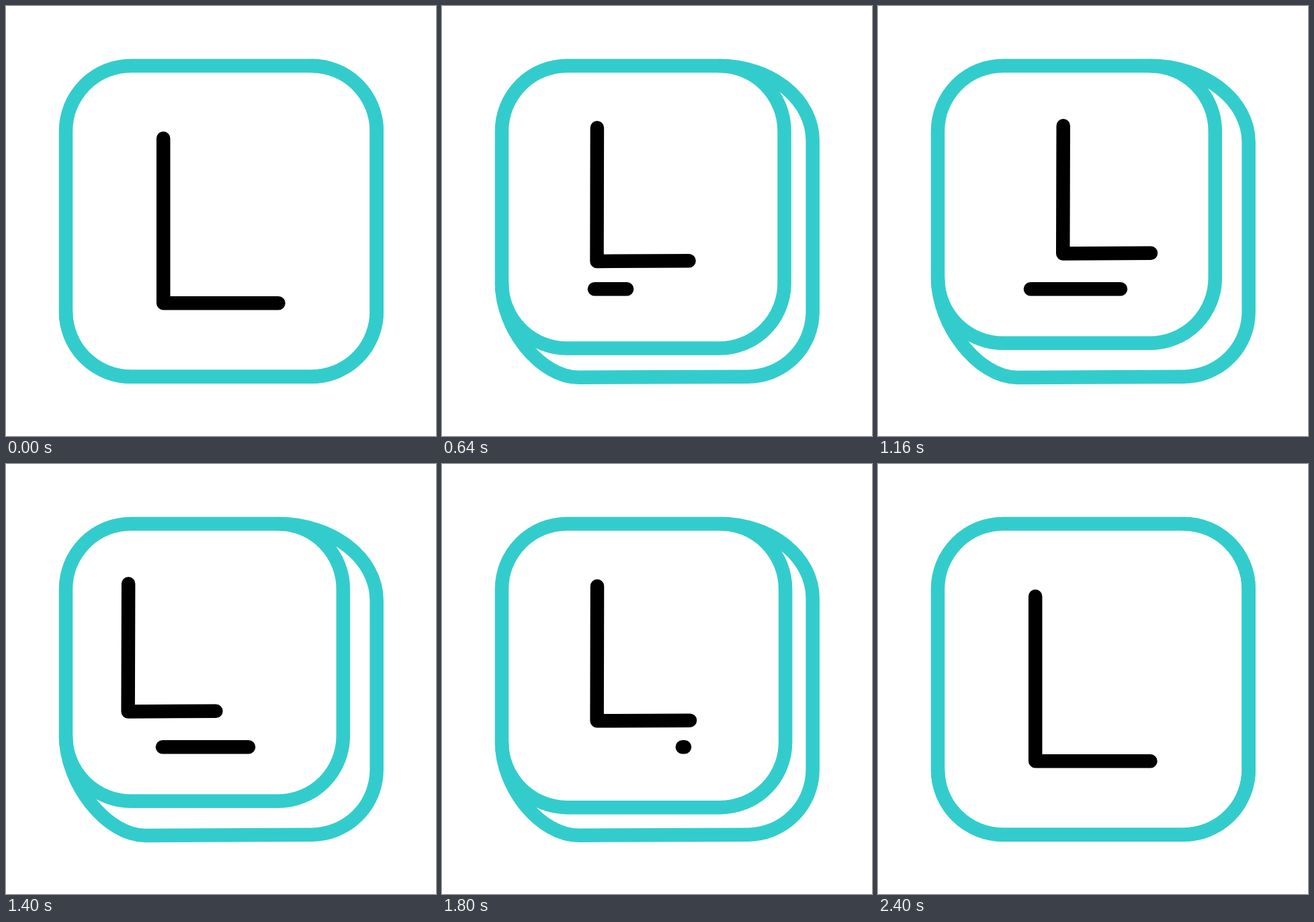
Animation, 640 px wide and 640 px high, one loop 2480 ms. Source, as an HTML page:

```html
<!DOCTYPE html>
<html lang="en">
<head>
<meta charset="utf-8">
<title>Key press</title>
<style>
  html, body { margin: 0; height: 100%; overflow: hidden; background: #fff; }
  svg { display: block; width: 100%; height: 100%; }
  path { fill: none; stroke-width: 20.5; stroke-linecap: round; stroke-linejoin: round; }
  .key { stroke: #3cc; }
  .ink { stroke: #000; }
</style>
</head>
<body>
<svg viewBox="0 0 640 640">
  <path id="side" class="key"/>
  <path id="face" class="key"/>
  <path id="letter" class="ink"/>
  <path id="line" class="ink"/>
</svg>
<script>
const LOOP = 2480, STEP = 40;
const LOW = 89, HIGH = 551.7, R = 97;

const $ = id => document.getElementById(id);
const mix = (a, b, k) => a + (b - a) * k;
const smooth = s => s * s * (3 - 2 * s);
const span = (t, start, end) => Math.min(1, Math.max(0, (t - start) / (end - start)));

// Cubic bezier easing (.833, 0, .167, 1), solved by bisection
function ease(u) {
  if (u <= 0 || u >= 1) return u;
  let lo = 0, hi = 1;
  for (let i = 0; i < 24; i++) {
    const s = (lo + hi) / 2, q = 1 - s;
    const x = 2.5 * s * q * q + 0.5 * s * s * q + s * s * s;
    if (x < u) lo = s; else hi = s;
  }
  return smooth(lo);
}

function facePath(edge) {
  const a = LOW + R, b = edge - R;
  const arc = (x, y) => `A${R} ${R} 0 0 1 ${x} ${y}`;
  return `M${a} ${LOW}H${b}${arc(edge, a)}V${b}${arc(b, edge)}H${a}${arc(LOW, b)}V${a}${arc(a, LOW)}Z`;
}

function sidePath(edge, p) {
  const start = edge - R, corner = HIGH - R, k = 0.5523;
  const right = LOW + R + 17 * p;
  const foot = LOW + R + 21 * p, base = HIGH + 1.3 * p;
  const bend = mix(k, 0.48, p);
  return `M${start} ${LOW}` +
    `C${mix(start, HIGH, k)} ${LOW} ${HIGH} ${mix(right, LOW, k)} ${HIGH} ${right}` +
    `V${corner}A${R} ${R} 0 0 1 ${corner} ${HIGH}L${foot} ${base}` +
    `C${mix(foot, LOW, bend)} ${base} ${LOW} ${mix(start, base, bend)} ${LOW} ${start}`;
}

function slide(t) {
  const A = 52.5;
  return A * (smooth(span(t, 890, 1123)) - 2 * smooth(span(t, 1123, 1357)) + smooth(span(t, 1357, 1600)));
}

function draw(t) {
  const p = ease(span(t, 132, 965)) - ease(span(t, 1458, 2291));
  const edge = mix(HIGH, 501.8, p), dx = slide(t);
  const point = (x0, y0, x1, y1) => `${mix(x0, x1, p) + dx} ${mix(y0, y1, p)}`;

  $('face').setAttribute('d', facePath(edge));
  $('side').setAttribute('d', sidePath(edge, p));
  $('letter').setAttribute('d', 'M' + point(234.2, 197, 230.3, 178.3) +
    'L' + point(234.2, 442.2, 229.8, 368.5) +
    'L' + point(405.5, 442.2, 360.6, 367.7));

  const from = ease(span(t, 1218, 1940)), to = ease(span(t, 298, 1020));
  $('line').setAttribute('d', to > from ? `M${mix(227, 361, from)} 421.2H${mix(227, 361, to)}` : '');
}

const begin = performance.now();
function tick() {
  const t = (performance.now() - begin) % LOOP;
  draw(Math.floor(t / STEP) * STEP);
  requestAnimationFrame(tick);
}
tick();
</script>
</body>
</html>
```
